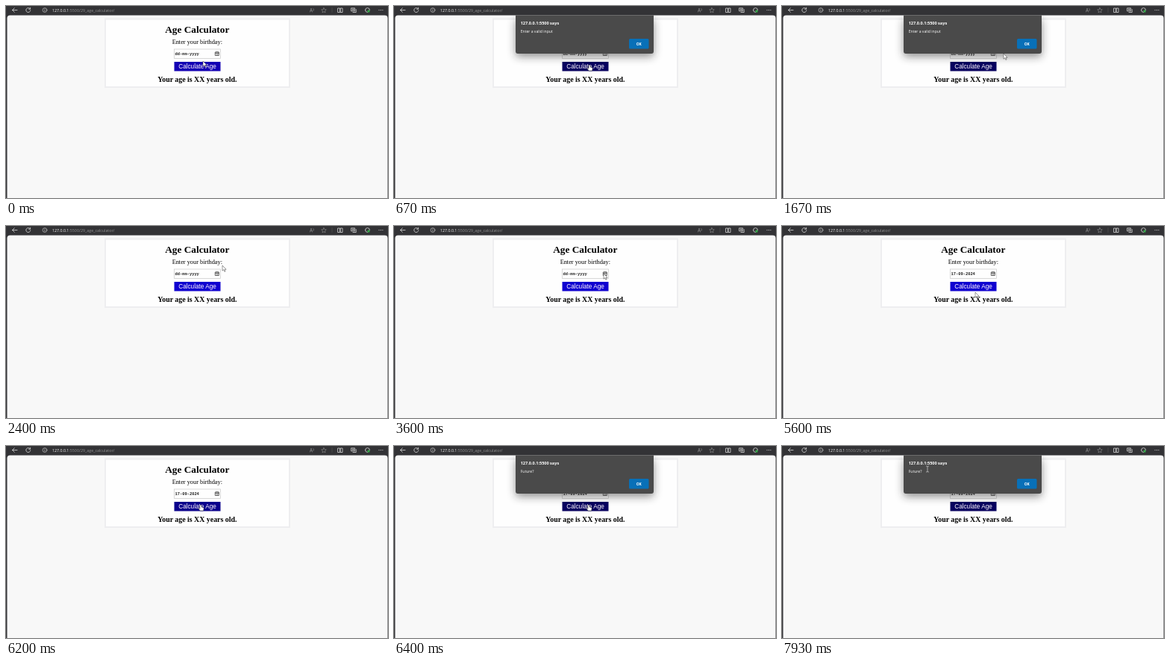
Recreate the animation shown at these times as an HTML page. Size 512 by 258 pixels, loop 8 s.

```html
<!DOCTYPE html>
<html lang="en">
<head>
<meta charset="utf-8">
<title>Age Calculator</title>
<style>
html, body { margin: 0; width: 100%; height: 100%; overflow: hidden; background: #333336; }
svg { display: block; width: 512px; height: 258px; }
.serif { font-family: "Liberation Serif", serif; fill: #000; text-anchor: middle; }
.sans { font-family: "Liberation Sans", sans-serif; }
.mono { font: bold 5.4px "Liberation Mono", monospace; fill: #222; }
.ui { font-family: "Open Sans", sans-serif; }
.bold { font-weight: bold; }
.line { fill: none; stroke-width: .8; stroke-linecap: round; stroke-linejoin: round; }

/* 1% of the loop is 80 ms */
.step { animation: 8s step-end infinite; }
.press { animation: press 8s linear infinite; }
.dialog { animation-name: dialog; }
.first { animation-name: first; }
.second { animation-name: second; }
.calendar { animation-name: calendar; }
.hover { animation-name: hover; }
.empty { animation-name: empty; }
.filled { animation-name: filled; }
.pointer { animation: move 8s ease-in-out infinite; }
.arrow { animation-name: arrow; }
.hand { animation-name: hand; }
.beam { animation-name: beam; }

@keyframes press {
  0% { fill: #1400b4; }
  3.75%, 26.9% { fill: #08005f; }
  29%, 76% { fill: #1000d0; }
  78.5%, 100% { fill: #08005f; }
}
@keyframes dialog {
  0%, 26.9%, 100% { visibility: hidden; }
  5%, 78.6% { visibility: visible; }
}
@keyframes first { 0% { opacity: 1; } 50%, 100% { opacity: 0; } }
@keyframes second { 0% { opacity: 0; } 50%, 100% { opacity: 1; } }
@keyframes calendar {
  0%, 66.25%, 100% { visibility: hidden; }
  46.25% { visibility: visible; }
}
@keyframes hover {
  0%, 66.25%, 100% { opacity: 0; transform: none; }
  56.25% { opacity: 1; transform: none; }
  64% { opacity: 1; transform: translateX(-11.65px); }
}
@keyframes empty { 0% { opacity: 1; } 66.25%, 100% { opacity: 0; } }
@keyframes filled { 0% { opacity: 0; } 66.25%, 100% { opacity: 1; } }
@keyframes move {
  0% { transform: translate(264px, 74px); }
  2.5%, 11.6% { transform: translate(262px, 79px); }
  15.6% { transform: translate(180px, 34px); }
  20.875% { transform: translate(297px, 64px); }
  22.5% { transform: translate(298px, 64px); }
  25.6%, 26.9% { transform: translate(328px, 51px); }
  30% { transform: translate(290px, 53px); }
  33% { transform: translate(282px, 57px); }
  37.5% { transform: translate(278px, 70px); }
  43%, 46.5% { transform: translate(281px, 64px); }
  55% { transform: translate(290px, 105px); }
  58.375% { transform: translate(264.5px, 128px); }
  64.4%, 66.25% { transform: translate(260px, 131px); }
  70% { transform: translate(259px, 89px); }
  74%, 82% { transform: translate(261px, 79px); }
  86.6% { transform: translate(288px, 43px); }
  95% { transform: translate(197px, 31px); }
  99%, 100% { transform: translate(195px, 31px); }
}
@keyframes arrow {
  0%, 17.5%, 83.1% { opacity: 1; }
  1.5%, 73%, 91%, 100% { opacity: 0; }
}
@keyframes hand {
  0%, 12.5%, 83.1%, 100% { opacity: 0; }
  1.5%, 73% { opacity: 1; }
}
@keyframes beam {
  0%, 17.5%, 100% { opacity: 0; }
  12.5%, 91% { opacity: 1; }
}
</style>
</head>
<body>
<svg viewBox="0 0 512 258">
  <defs>
    <filter id="blur" x="-30%" y="-40%" width="160%" height="180%"><feGaussianBlur stdDeviation="6"/></filter>
    <clipPath id="page"><path d="M1.5 258V16.500q0-4 4-4H507.500q4 0 4 4V258Z"/></clipPath>
  </defs>

  <rect width="512" height="258" fill="#333336"/>

  <!-- browser bar -->
  <g class="line" stroke="#d8d8d8">
    <path d="M15 5.500H8.500M11.300 2.700 8.500 5.500l2.800 2.800"/>
    <path d="M32.300 3.800A3 3 0 1 0 32.800 6M32.600 2.200v2h-2"/>
    <circle cx="52" cy="5.500" r="2.900" stroke-width=".6"/>
    <path d="M52 5.200V7M52 3.900v.1" stroke-width=".6"/>
    <g stroke="#929292" stroke-width=".6">
      <path d="M407.500 8 409 3l1.500 5M408 6.400h2M412 3.500q1.300 1.500 0 3"/>
      <path d="m426 2.500 1 2.100 2.300.3-1.700 1.600.4 2.300-2-1.100-2 1.100.4-2.300-1.700-1.600 2.300-.3Z"/>
    </g>
    <path d="M437 2.500v6" stroke="#5c5c5e" stroke-width=".5"/>
    <path d="M445 3h2.500v5.500h-2.500ZM448.500 3h2.500v5.500h-2.500Z"/>
    <path d="M463 2.800h4.500v4H463ZM465 8.500h4.200V4.600M465.200 3.800v2M464.200 4.800h2"/>
    <path d="M481.500 5.500q0-3 3-3t3 3M481.500 5.500q0 3 3 3"/>
    <circle cx="486" cy="7" r="1.700" fill="#38a84a" stroke="none"/>
    <path d="M500 5.500h.1M502.400 5.500h.1M504.800 5.500h.1" stroke-width="1.100"/>
  </g>
  <text class="ui" x="62" y="7.700" font-size="5.300" fill="#f4f4f4">127.0.0.1<tspan fill="#929292">:5500/29_age_calculator/</tspan></text>

  <g clip-path="url(#page)">
    <rect y="12" width="512" height="246" fill="#f8f8f8"/>
    <rect x="133" y="17.500" width="247" height="91.500" fill="#fefefe" stroke="#eeeef0" stroke-width="2"/>
    <text class="serif bold" x="256.300" y="35.700" font-size="13.300">Age Calculator</text>
    <text class="serif" x="256.300" y="51" font-size="8.300">Enter your birthday:</text>

    <rect x="225.500" y="58" width="62" height="12.500" fill="#fefefe" stroke="#c8c8c8" stroke-width=".7"/>
    <text class="mono step empty" x="226.500" y="66">dd-mm-yyyy</text>
    <text class="mono step filled" x="226.500" y="66">17-09-2024</text>
    <path class="line" d="M280.700 62h4.600v4.500h-4.600ZM280.700 63.400h4.600M282 61.300v.7M284 61.300v.7M282 65h2" stroke="#444"/>

    <rect class="press" x="225.500" y="75" width="62" height="12.500"/>
    <text class="sans" x="256.500" y="84.200" font-size="8.200" fill="#fff" text-anchor="middle">Calculate Age</text>
    <text class="serif bold" x="256.300" y="101.500" font-size="9.900">Your age is XX years old.</text>

    <g class="step calendar">
      <rect x="227" y="82" width="88" height="111" rx="4" fill="#505050" opacity=".5" filter="url(#blur)"/>
      <rect x="226" y="71.500" width="89.500" height="116" rx="2.500" fill="#fefefe" stroke="#bbb" stroke-width=".6"/>
      <text class="sans bold" x="230" y="83" font-size="5" fill="#181818">September, 2024</text>
      <path d="M271 80.500h3l-1.500 1.900Z" fill="#333"/>
      <path class="line" d="M292 85v-6M289.500 81.500 292 79l2.500 2.500M305.500 79v6M303 82.500l2.500 2.500 2.500-2.500" stroke="#333"/>
      <rect x="288.200" y="102.700" width="11" height="11" rx=".6" fill="#686868" stroke="#181818"/>
      <rect class="step hover" x="265" y="125.500" width="11.200" height="11.500" rx=".6" fill="#dcdcdc" stroke="#707070" stroke-width=".8"/>
      <g id="days" class="sans" font-size="5" text-anchor="middle"></g>
      <g class="sans" font-size="5" fill="#2b7480">
        <text x="234.500" y="181">Clear</text>
        <text x="293" y="181">Today</text>
      </g>
    </g>
  </g>

  <g class="step dialog">
    <g clip-path="url(#page)">
      <rect x="163" y="18" width="185" height="50" rx="4" fill="#202020" opacity=".5" filter="url(#blur)"/>
    </g>
    <path d="M163 12.500H348V61q0 3-3 3H166q-3 0-3-3Z" fill="#4a4a4a"/>
    <g class="ui" fill="#fff">
      <text class="bold" x="169.700" y="24.500" font-size="5.550">127.0.0.1:5500 says</text>
      <g font-size="5.100">
        <text class="step first" x="169.700" y="36.300">Enter a valid input</text>
        <text class="step second" x="169.700" y="36.300">Future?</text>
      </g>
      <rect x="315" y="44" width="26.500" height="13.500" rx="1.500" fill="#0870b8"/>
      <text class="bold" x="328.200" y="52.500" font-size="4.900" text-anchor="middle">OK</text>
    </g>
  </g>

  <g class="pointer" stroke-linejoin="round">
    <path class="step arrow" d="M0 0V7.200L1.700 5.700 2.900 8.400 4.100 7.900 2.900 5.300H5.100Z" fill="#fff" stroke="#333" stroke-width=".5"/>
    <path class="step hand" d="M-1 .7Q0-.6 1 .7V3l2.600.8q.7.300.6 1.200L3.600 8H-.8L-3 5.200q0-1.200 1-.8l1 .8Z" fill="#fff" stroke="#222" stroke-width=".5"/>
    <path class="step beam line" d="M-1.500-4Q0-4 0-3.200 0-4 1.500-4M0-3.200V3.200M-1.500 4Q0 4 0 3.200 0 4 1.500 4" stroke="#c4c4c4"/>
  </g>
</svg>
<script>
const days = document.getElementById('days');

function addCell(label, column, y, color) {
  const cell = document.createElementNS(days.namespaceURI, 'text');
  cell.setAttribute('x', 235.7 + column * 11.63);
  cell.setAttribute('y', y);
  cell.setAttribute('fill', color);
  cell.textContent = label;
  days.append(cell);
}

['Su', 'Mo', 'Tu', 'We', 'Th', 'Fr', 'Sa'].forEach((name, i) => addCell(name, i, 98.8, '#282828'));

for (let i = 0; i < 42; i++) {
  const inMonth = i < 30;
  const day = inMonth ? i + 1 : i - 29;
  const color = i === 5 ? '#fff' : inMonth ? '#202020' : '#8a8a8a';
  addCell(day, i % 7, 110 + Math.floor(i / 7) * 11.6, color);
}
</script>
</body>
</html>
```
